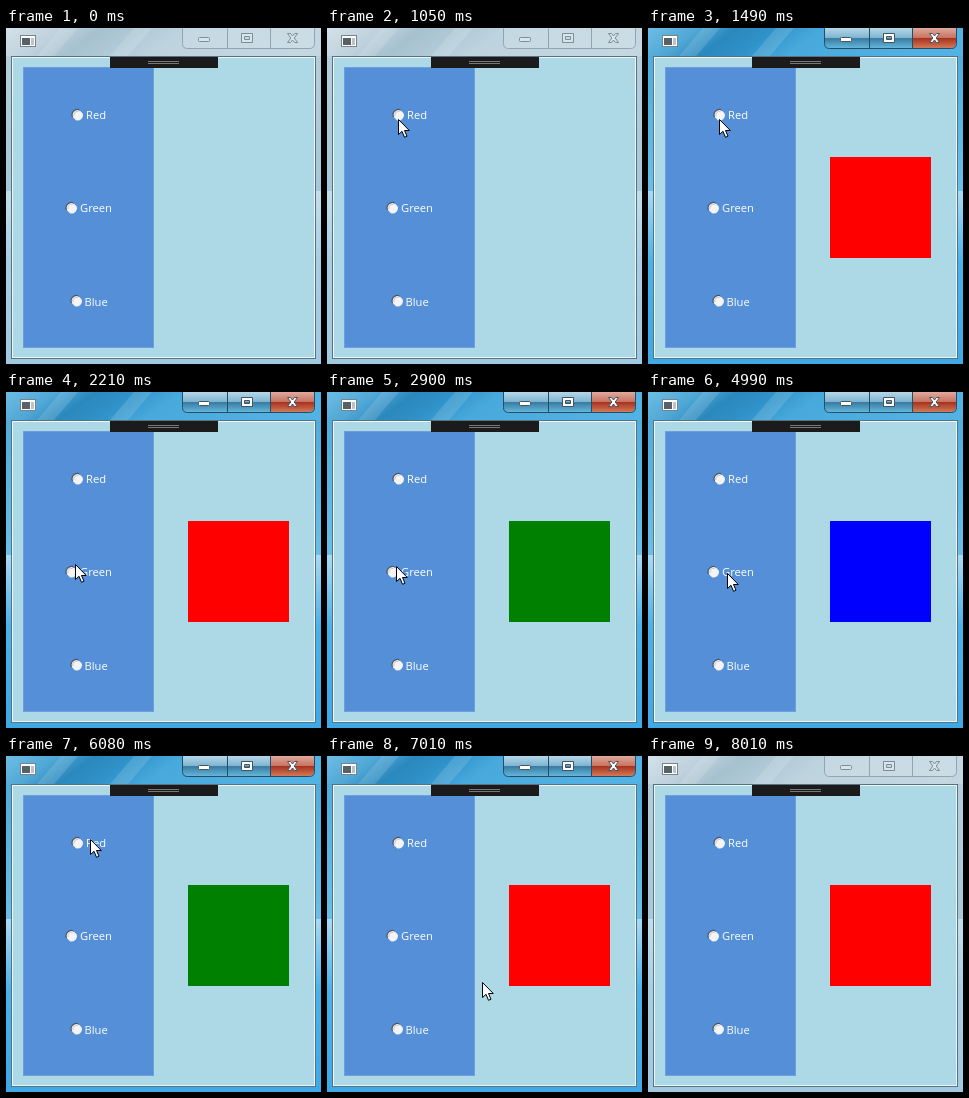
An HTML page for the animation above (8.1 s loop, 315 by 336 pixels).

```html
<!DOCTYPE html>
<html lang="en">
<head>
<meta charset="utf-8">
<title>Colour picker window</title>
<style>
  html, body { margin: 0; width: 100%; height: 100%; overflow: hidden; }
  svg { display: block; }
  text { font: 11.2px "Open Sans", "Noto Sans", sans-serif; fill: #fff; }
</style>
</head>
<body>
<svg width="315" height="336" viewBox="0 0 315 336">
  <defs>
    <linearGradient id="idleSide" x2="0" y2="1">
      <stop offset="0" stop-color="#b9cfdb"/>
      <stop offset=".485" stop-color="#a6c8da"/>
      <stop offset=".486" stop-color="#c3deec"/>
      <stop offset=".7" stop-color="#a7cee4"/>
      <stop offset="1" stop-color="#a0cae2"/>
    </linearGradient>
    <linearGradient id="idleTop" x2="1" y2=".12">
      <stop offset="0" stop-color="#d3e2ea"/>
      <stop offset=".18" stop-color="#bed1dc"/>
      <stop offset=".3" stop-color="#a6c1cf"/>
      <stop offset=".42" stop-color="#afc9d6"/>
      <stop offset=".56" stop-color="#bdd3de"/>
      <stop offset="1" stop-color="#c4d7e1"/>
    </linearGradient>
    <linearGradient id="liveSide" x2="0" y2="1">
      <stop offset="0" stop-color="#4aa9da"/>
      <stop offset=".485" stop-color="#69bfe9"/>
      <stop offset=".486" stop-color="#a9daf4"/>
      <stop offset=".7" stop-color="#4ab1ea"/>
      <stop offset="1" stop-color="#3fa9e6"/>
    </linearGradient>
    <linearGradient id="liveTop" x2="1" y2=".12">
      <stop offset="0" stop-color="#6dbde4"/>
      <stop offset=".16" stop-color="#50a8d6"/>
      <stop offset=".28" stop-color="#2b88bd"/>
      <stop offset=".4" stop-color="#2f92c8"/>
      <stop offset=".55" stop-color="#48a9dc"/>
      <stop offset="1" stop-color="#53b2e4"/>
    </linearGradient>
    <linearGradient id="glass" x2="0" y2="1">
      <stop offset="0" stop-color="#b5d7e8"/>
      <stop offset=".48" stop-color="#80b5d2"/>
      <stop offset=".5" stop-color="#37799f"/>
      <stop offset="1" stop-color="#65b5da"/>
    </linearGradient>
    <linearGradient id="danger" x2="0" y2="1">
      <stop offset="0" stop-color="#e0aa9d"/>
      <stop offset=".48" stop-color="#c87462"/>
      <stop offset=".5" stop-color="#a52f1b"/>
      <stop offset="1" stop-color="#d27a59"/>
    </linearGradient>
    <path id="caps" d="M176.500-1V15.500q0 5 5 5H303.500q5 0 5-5V-1M221.500 0V20M264.500 0V20"/>
    <g id="glyphs" stroke-width="1">
      <rect x="192.500" y="9.500" width="11" height="4" rx="1"/>
      <path fill-rule="evenodd" d="M235.500 5.500h11v9h-11zM238.500 8.500h5v3h-5z"/>
      <path d="M281.500 5.500h3l2 2.500 2-2.500h3l-3.300 4.500 3.300 4.500h-3l-2-2.500-2 2.500h-3l3.300-4.500z"/>
    </g>
    <g id="radio">
      <circle r="5.500" fill="#f4f4f4"/>
      <path d="M-4.800 2.500A5.400 5.400 0 0 1 2.500-4.800" fill="none" stroke="#4d5560" stroke-width="1.200"/>
      <path d="M2-5.800L5.800-2M-5.800 2L-2 5.800" stroke="#558fd8" stroke-width="1.400"/>
      <path d="M-3.500 1A3.600 3.600 0 0 1 1-3.500" fill="none" stroke="#c3c6ca"/>
    </g>
  </defs>

  <g id="idle">
    <rect width="315" height="336" fill="url(#idleSide)"/>
    <rect width="315" height="28" fill="url(#idleTop)"/>
    <path d="M55 0H72L48 28H31zM128 0H146L122 28H104z" fill="#fff" opacity=".13"/>
    <use href="#caps" fill="#fff" fill-opacity=".12" stroke="#8fa5b2"/>
    <use href="#glyphs" fill="#d9e4eb" stroke="#7c8d99"/>
  </g>
  <g id="live">
    <rect width="315" height="336" fill="url(#liveSide)"/>
    <rect width="315" height="28" fill="url(#liveTop)"/>
    <path d="M55 0H72L48 28H31zM128 0H146L122 28H104z" fill="#fff" opacity=".13"/>
    <path d="M177 0H264V20H182q-5 0-5-5z" fill="url(#glass)"/>
    <path d="M264 0H308V15q0 5-5 5H264z" fill="url(#danger)"/>
    <use href="#caps" fill="none" stroke="#234e66"/>
    <use href="#glyphs" fill="#fff" stroke="#46545f"/>
  </g>

  <g shape-rendering="crispEdges">
    <rect x="14" y="7" width="16" height="12" fill="#77828a"/>
    <rect x="15" y="8" width="14" height="10" fill="#fff"/>
    <rect x="16" y="10" width="8" height="7" fill="#566168"/>
    <rect x="25" y="10" width="3" height="7" fill="#b9c3c9"/>
    <rect x="5" y="28" width="305" height="303" fill="#59727f"/>
    <rect x="6" y="29" width="303" height="301" fill="#eaf6fa"/>
    <rect x="7" y="30" width="301" height="299" fill="#add8e6"/>
    <rect x="17" y="39" width="131" height="281" fill="#6d9fdf"/>
    <rect x="18" y="40" width="129" height="279" fill="#558fd8"/>
    <rect x="104" y="29" width="108" height="11" fill="#1b1b1c"/>
    <path d="M142 33.500h31M142 35.500h31" stroke="#77777a"/>
    <rect id="square" x="182" y="129" width="101" height="101"/>
  </g>

  <use href="#radio" x="71.500" y="87"/><text x="80" y="91">Red</text>
  <use href="#radio" x="65.500" y="180"/><text x="74" y="184">Green</text>
  <use href="#radio" x="70.500" y="273"/><text x="78.500" y="277.500">Blue</text>

  <path id="cursor" d="M.5.500V15.500L4 12.300 6.500 18.300 9 17.200 6.500 11.500H11.300z" fill="#fff" stroke="#000"/>
</svg>
<script>
const LOOP = 8100, TICK = 78;
const $ = id => document.getElementById(id);
const linear = p => p;
const easeOut = p => p * (2 - p);
const smooth = p => p * p * (3 - 2 * p);

// start, number of steps, from, to, easing
const moves = [
  [350, 5, [244, 322], [71, 97], easeOut, true],
  [890, 3, [71, 97], [71, 91], linear],
  [1570, 10, [71, 91], [69, 174], smooth],
  [3130, 5, [69, 174], [76, 268], smooth],
  [3590, 2, [76, 268], [76, 273], linear],
  [4450, 8, [76, 273], [79, 177], smooth],
  [5850, 4, [79, 177], [84, 83], smooth],
  [6930, 3, [84, 83], [191, 298], linear]
];
const colours = [[0, "none"], [1490, "#f00"], [2900, "#008000"], [4050, "#00f"], [5620, "#008000"], [6780, "#f00"]];

const latest = (list, t) => list.filter(item => item[0] <= t).pop();

function cursorAt(t) {
  const move = latest(moves, t);
  if (!move || t >= 7170) return null;
  const [start, count, from, to, ease, enters] = move;
  const step = Math.floor((t - start + 4) / TICK) + (enters ? 0 : 1);
  const p = ease(Math.min(step / count, 1));
  return from.map((a, i) => Math.round(a + (to[i] - a) * p));
}

function draw(now) {
  const t = now % LOOP;
  const at = cursorAt(t);
  $("cursor").style.display = at ? "" : "none";
  if (at) $("cursor").setAttribute("transform", `translate(${at})`);
  $("square").setAttribute("fill", latest(colours, t)[1]);
  $("live").setAttribute("opacity", t < 1200 || t >= 8010 ? 0 : t < 1280 ? .5 : 1);
}

const begin = performance.now();
function frame() {
  draw(performance.now() - begin);
  requestAnimationFrame(frame);
}
frame();
</script>
</body>
</html>
```
